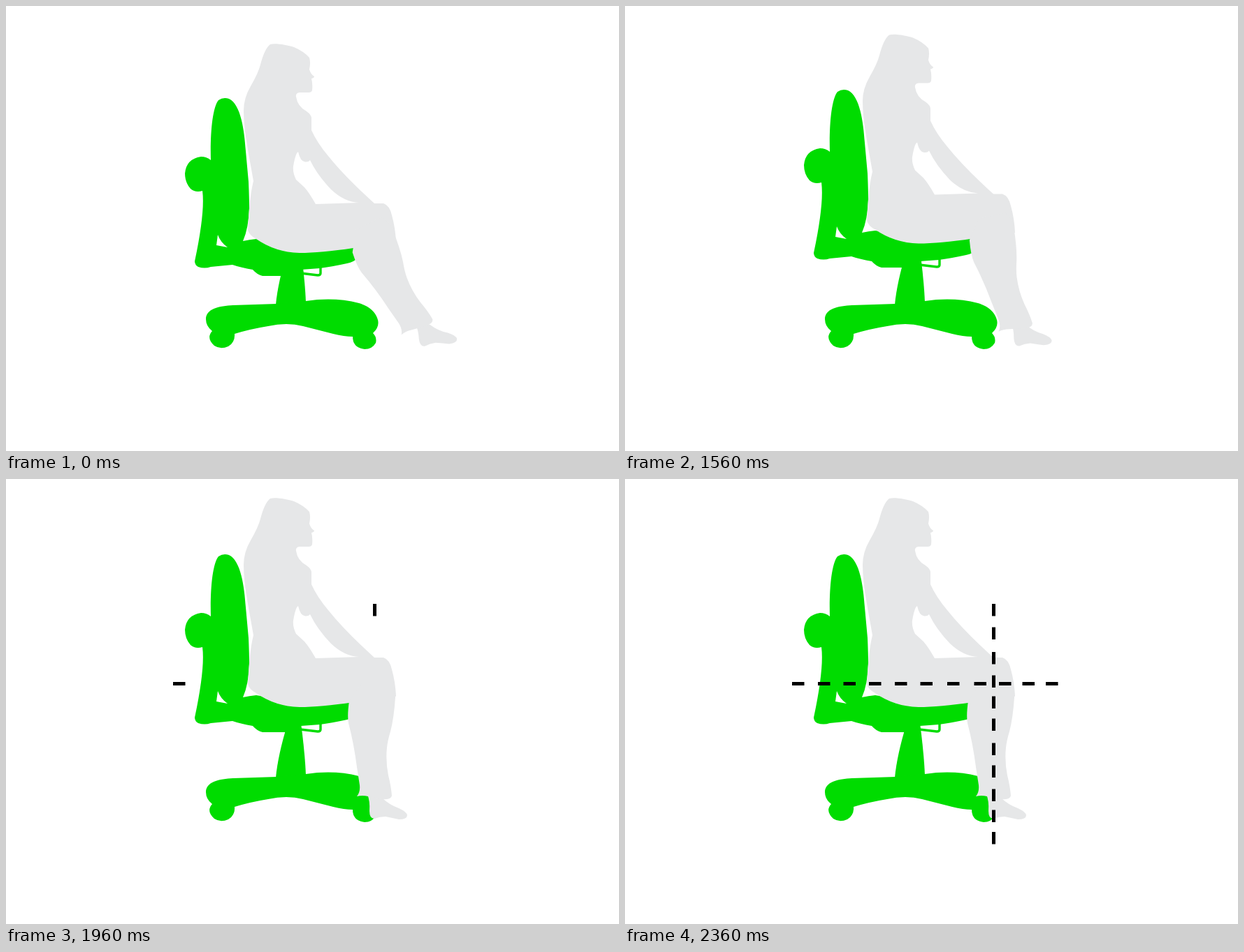
Recreate the animation shown at these times as an HTML page. Size 877 by 638 pixels, loop 4.4 s.

```html
<!DOCTYPE html>
<html lang="en">
<head>
<meta charset="utf-8">
<title>Chair height</title>
<style>
  html, body { margin: 0; width: 100%; height: 100%; overflow: hidden; background: #fff; }
  svg { display: block; width: 100%; height: 100%; }
  .chair { fill: #00dc00; }
  .lever { fill: none; stroke: #00dc00; stroke-width: 3.4; }
  .person { fill: #e6e7e8; }
</style>
</head>
<body>
<svg viewBox="0 0 877 638">
  <g class="chair">
    <path d="M386 428 Q389 396 403 350 H422 L424 366 Q428 400 429 424 V440 H386Z"/>
    <path d="M286 449 C286 434 305 430 325 429 L387 427 L429 423
      Q470 417 505 426 Q525 432 531 447 Q536 459 525 469
      Q531 475 529 483 Q524 492 513 492 Q496 490 496 474
      Q484 474 468 470 L425 459 Q402 453 375 459 Q350 463 327 470
      Q328 482 318 488 Q307 493 298 487 Q286 476 295 466 Q286 459 286 449Z"/>
  </g>
  <g id="seat">
    <path class="chair" fill-rule="evenodd" d="M304 135 Q311 130 319 133 C336 141 341 178 343 208 L347 252
      Q348 275 348 290 Q347 319 339 337 Q348 335 358 334 L364 335 Q385 341 505 336 V360
      Q498 367 488 369 Q465 374 449 376 L422 378 V387 H367 Q359 385 353 378 Q336 375 324 371
      L293 374 Q284 377 275 374 Q270 371 270 366 Q285 295 281 265 Q271 268 264 262
      Q256 253 256 240 Q258 219 279 216 Q287 216 293 221 C292 185 295 146 304 135Z
      M303 328 L301 343 L317 346 Q307 339 303 328Z"/>
    <path class="lever" d="M421 383 L446 386 Q450 386 450 383 V375"/>
  </g>
  <g class="person">
    <path id="foot" d="M517 452 Q521 462 520 476 Q520 487 527 487 Q535 484 543 484 Q553 486 562 488
      Q574 488 574 482 Q573 477 562 472 Q548 467 538 457Z"/>
    <g id="body">
      <path fill-rule="evenodd" d="M378 55 C386 53 402 56 412 59 Q426 65 434 74 Q436 81 434 91
        Q436 98 441 101 Q441 103 437 104 Q439 112 438 121 Q437 124 433 124 H420 Q414 125 415 130
        Q417 144 430 151 Q437 156 437 161 V178 Q445 196 461 215 Q484 244 527 283 H540
        Q549 286 552 300 Q557 318 558 338 L545 356 L497 347 Q450 354 420 354 Q385 353 358 334
        Q348 329 346 321 Q348 275 354 251 C348 215 340 180 340 150 Q340 132 350 115
        Q361 96 364 84 Q370 61 378 55Z
        M418 209 Q421 223 428 223.500 Q433 224 435 221 Q445 242 465 263 Q484 281 505 282
        Q475 283 443 284 Q434 268 427 260 L415 249 Q410 239 411 230 Q413 217 416 211Z"/>
      <path id="shin" d="M491 345 Q488 366 490 377 Q498 408 502 440 L506 466 Q507 476 502 482
        Q510 480 518 482 L540 486 Q551 487 552 481 Q551 468 547 452 Q543 432 545 412
        Q546 402 550 389 Q555 370 557 340 Q557 325 550 318 H510Z"/>
    </g>
  </g>
  <g id="dashes"></g>
</svg>
<script>
  const LOOP = 4400, STEP = 40, RISE_START = 1360, DASH_START = 1960, BEND = 26;
  const part = id => document.getElementById(id);
  const [seat, body, shin, foot, dashes] = ['seat', 'body', 'shin', 'foot', 'dashes'].map(part);
  const move = (node, transform) => node.setAttribute('transform', transform);
  const radians = degrees => degrees * Math.PI / 180;

  const columns = [239, 276, 312.5, 349, 386, 422.5, 461, 499.5, 535, 568.5, 602];
  const rows = [179, 212.5, 248, 281.5, 311.5, 343.5, 378.5, 410.5, 444.5, 474.5, 506];
  columns.forEach((x, i) => {
    dashes.insertAdjacentHTML('beforeend',
      `<path d="M${x} 291h17.5v5h-17.5z M525 ${rows[i]}h5v17.5h-5z"/>`);
  });

  function draw(now) {
    const time = now % LOOP;
    const progress = Math.min(10, Math.max(0, Math.floor((time - RISE_START) / STEP))) / 10;
    const angle = BEND * (1 - progress);
    const reach = 72 * Math.sin(radians(angle)) / Math.sin(radians(BEND));

    move(seat, `translate(0 ${-24 * progress})`);
    move(body, `translate(0 ${-27 * progress})`);
    move(shin, `rotate(${-angle} 511 339)`);
    // The foot slides along the floor, tilting slightly about the heel.
    move(foot, `translate(${reach} ${1 - progress}) rotate(${-7 * (1 - progress)} 525 486)`);

    const shown = Math.floor((time - DASH_START) / STEP) + 1;
    [...dashes.children].forEach((dash, i) => {
      dash.style.display = i < shown ? '' : 'none';
    });
  }

  const start = performance.now();
  function tick() {
    draw(performance.now() - start);
    requestAnimationFrame(tick);
  }
  tick();
</script>
</body>
</html>
```
